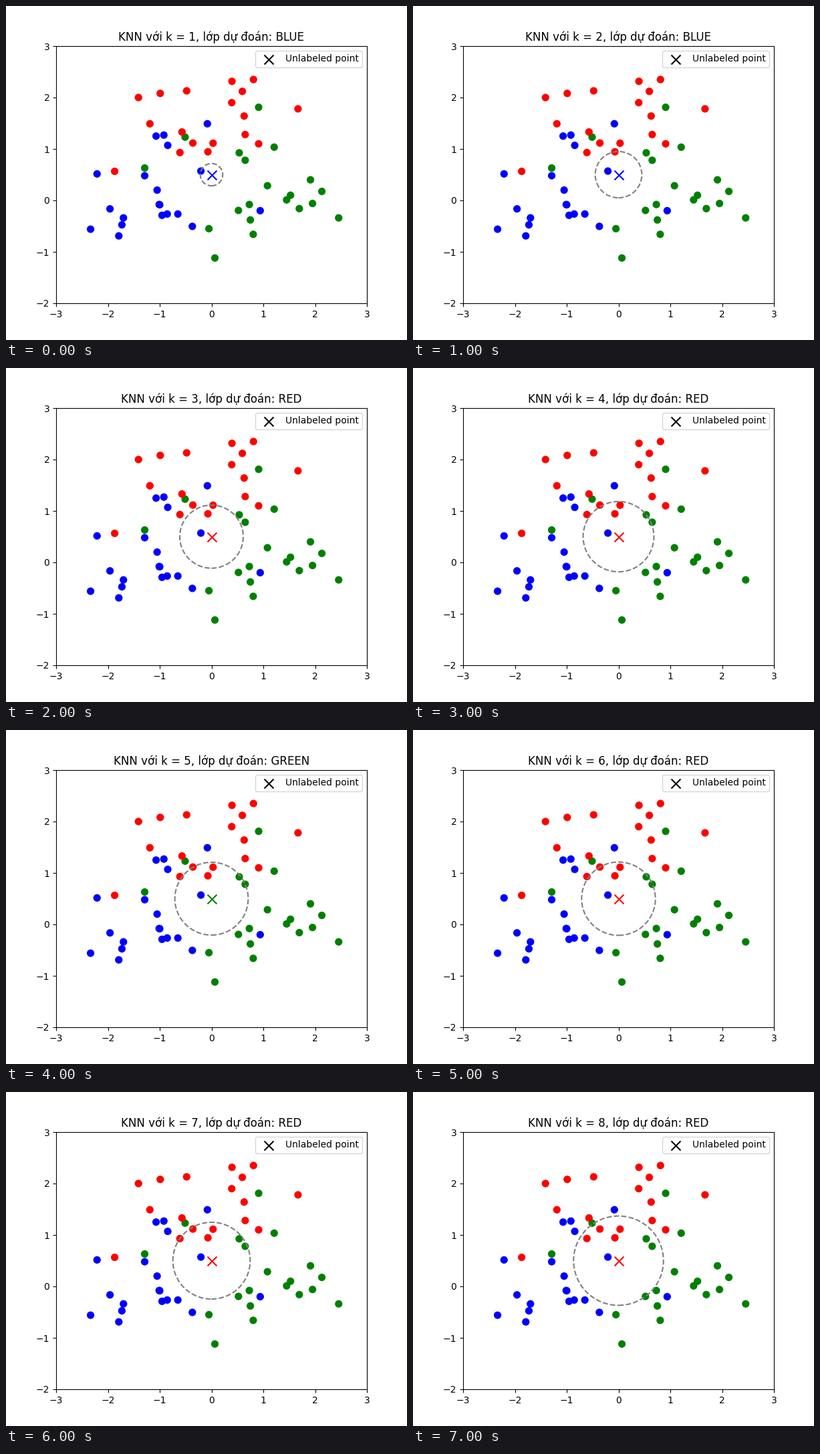
Write a matplotlib script that moves like this. It is 600 px wide and 500 px high and loops after 8 s.

```python
import numpy as np
import matplotlib.pyplot as plt
from matplotlib.animation import FuncAnimation

plt.rcParams["font.family"] = "DejaVu Sans"

POINTS = {
    "blue": [(-0.08, 1.49), (-1.07, 1.25), (-0.92, 1.27), (-0.845, 1.07),
             (-2.21, 0.515), (-1.29, 0.48), (-0.205, 0.57), (-1.05, 0.2),
             (-1.01, -0.08), (-1.0, -0.085), (-0.955, -0.29), (-0.855, -0.265),
             (-0.65, -0.265), (-0.37, -0.505), (-1.96, -0.165), (-1.7, -0.34),
             (-1.73, -0.475), (-1.79, -0.69), (-2.335, -0.56), (0.94, -0.2)],
    "green": [(0.91, 1.81), (-0.51, 1.23), (-1.29, 0.63), (1.21, 1.035),
              (0.535, 0.925), (0.65, 0.78), (1.08, 0.285), (1.91, 0.4),
              (2.13, 0.175), (1.525, 0.1), (1.45, 0.01), (1.95, -0.06),
              (1.695, -0.16), (2.455, -0.34), (0.73, -0.08), (0.52, -0.195),
              (0.75, -0.38), (0.805, -0.66), (-0.05, -0.55), (0.065, -1.12)],
    "red": [(-1.41, 2.0), (-0.99, 2.08), (-0.48, 2.13), (0.395, 2.315),
            (0.595, 2.12), (0.81, 2.35), (0.39, 1.9), (0.63, 1.64),
            (1.67, 1.78), (-1.19, 1.49), (-0.57, 1.33), (-0.36, 1.115),
            (-0.61, 0.93), (-0.07, 0.945), (0.03, 1.112), (0.65, 1.28),
            (0.91, 1.1), (-1.87, 0.565)],
}
QUERY = (0, 0.5)
MAX_K = 8

names = list(POINTS)
xy = np.vstack([POINTS[n] for n in names])
labels = np.repeat(np.arange(len(names)), [len(POINTS[n]) for n in names])
dist = np.hypot(*(xy - QUERY).T)
order = np.argsort(dist)

fig, ax = plt.subplots(figsize=(6, 5), dpi=100)
ax.set(xlim=(-3, 3), ylim=(-2, 3))
ax.scatter(*xy.T, c=[names[i] for i in labels], s=50)
cross = ax.scatter(*QUERY, c="black", marker="x", s=100, label="Unlabeled point")
ax.legend(loc="upper right")
circle = plt.Circle(QUERY, 0.2, fill=False, color="gray", linestyle="--",
                    linewidth=1.5)
ax.add_patch(circle)
title = ax.set_title("")


def update(frame):
    k = frame + 1
    nearest = order[:k]
    # A tied vote goes to the first class in the list
    winner = names[np.bincount(labels[nearest]).argmax()]
    circle.set_radius(dist[nearest[-1]])
    cross.set_color(winner)
    title.set_text(f"KNN với k = {k}, lớp dự đoán: {winner.upper()}")
    return circle, cross, title


anim = FuncAnimation(fig, update, frames=MAX_K, interval=1000, repeat=True,
                     repeat_delay=0)
plt.show()
```
